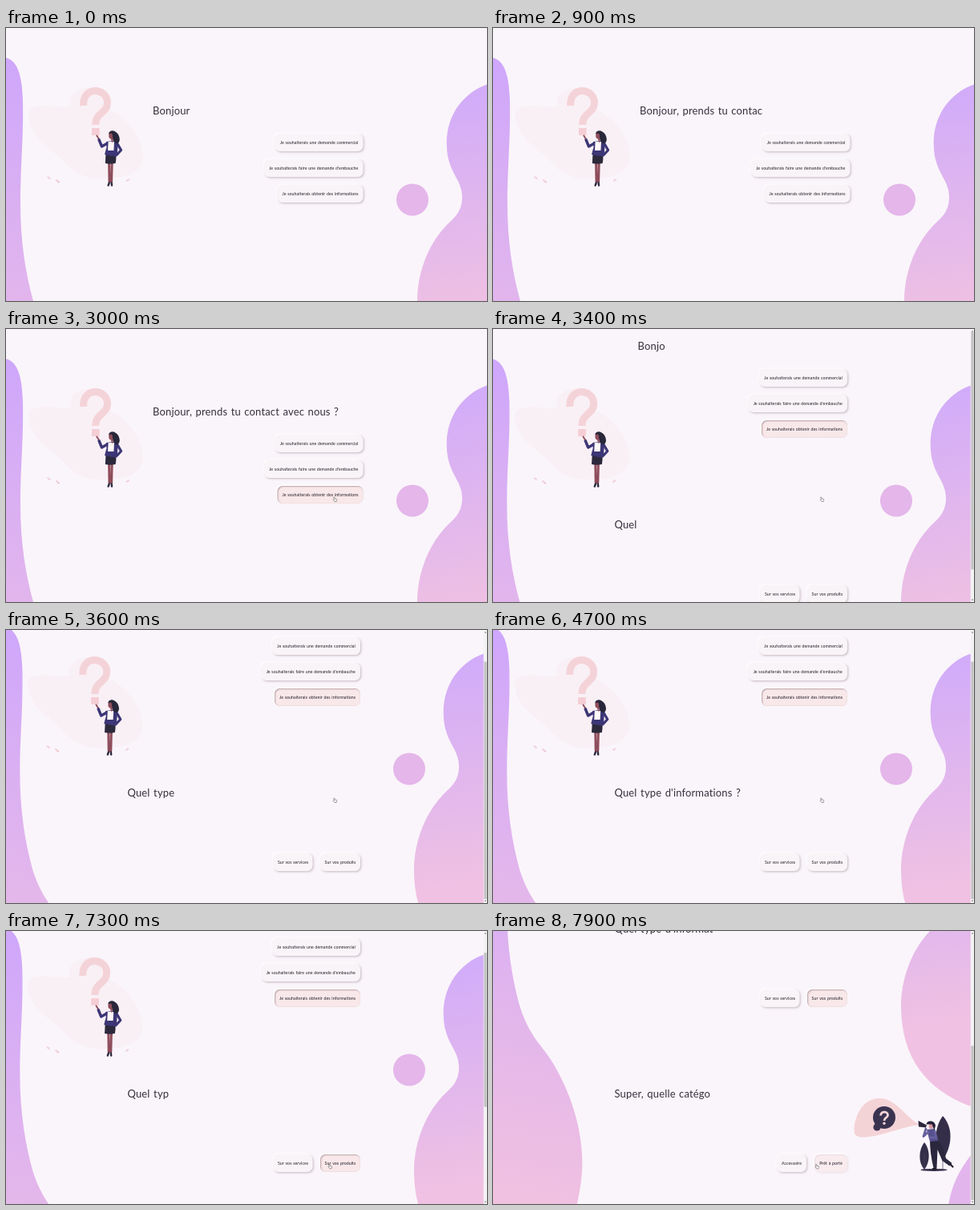
These frames come from a looping animation (600 by 341 pixels, 8000 ms). An HTML page with a canvas:

```html
<!DOCTYPE html>
<html lang="fr">
<head>
<meta charset="utf-8">
<title>Formulaire de contact</title>
<style>
  html, body { margin: 0; width: 100%; height: 100%; overflow: hidden; background: #faf5fa; }
  canvas { display: block; width: 600px; height: 341px; }
</style>
</head>
<body>
<canvas id="stage"></canvas>
<script>
const W = 600, H = 341, LOOP = 8000;
const CLICK_1 = 3130, CLICK_2 = 6880, SCROLL_DELAY = 450, CHAR_MS = 50;
const canvas = document.getElementById('stage');
const ctx = canvas.getContext('2d');
const dpr = window.devicePixelRatio || 1;
canvas.width = W * dpr;
canvas.height = H * dpr;

const clamp = v => Math.max(0, Math.min(1, v));
const ramp = (t, a, b) => clamp((t - a) / (b - a));
const ease = p => p * p * (3 - 2 * p);
const mix = (a, b, p) => a + (b - a) * p;

function fill(path, color) {
  ctx.fillStyle = color;
  ctx.fill(typeof path === 'string' ? new Path2D(path) : path);
}

function line(path, color, width, cap = 'round') {
  ctx.strokeStyle = color;
  ctx.lineWidth = width;
  ctx.lineCap = cap;
  ctx.lineJoin = 'round';
  ctx.stroke(new Path2D(path));
}

function oval(x, y, rx, ry, color, angle = 0) {
  const path = new Path2D();
  path.ellipse(x, y, rx, ry, angle, 0, Math.PI * 2);
  fill(path, color);
}

function gradient(x0, y0, x1, y1, from, to) {
  const g = ctx.createLinearGradient(x0, y0, x1, y1);
  g.addColorStop(0, from);
  g.addColorStop(1, to);
  return g;
}

function at(dx, dy, draw) {
  ctx.save();
  ctx.translate(dx, dy);
  draw();
  ctx.restore();
}

function setShadow(color, dx, dy, blur) {
  ctx.shadowColor = color;
  ctx.shadowOffsetX = dx * dpr;
  ctx.shadowOffsetY = dy * dpr;
  ctx.shadowBlur = blur * dpr;
}

function leftWave() {
  fill('M-1 37C14 40 20 58 21 90C22 140 18 170 18 220C18 265 24 305 34 341C41 363 50 378 62 393' +
    'C90 428 112 485 112 536C112 555 109 572 105 590L-1 590Z',
    gradient(70, 37, -40, 590, '#cea6fc', '#f2c2df'));
}

function rightWave() {
  fill('M620 66L600 70.5C565 83 544 118 551 160C556 184 569 192 569 211C569 232 557 238 548 248' +
    'C524 274 513 310 513 341C513 405 545 446 600 466L620 470Z',
    gradient(550, 70, 595, 360, '#d0abfa', '#f0c1e2'));
  fill('M620 500L600 527C585 547 576 565 572 590L620 590Z', '#e3b5ed');
  oval(507, 214.5, 20, 20, '#e4b6ea');
}

function questionScene() {
  fill('M28 112C26 97 42 96 62 98C84 101 100 93 120 98C145 105 172 135 171 162C169 184 140 190 112 188' +
    'C84 186 76 168 62 157C44 143 31 132 28 112Z', '#f9f0f5');
  oval(103, 92, 23, 17, '#f9f0f5');
  line('M96.7 97C95 72 126 74 126.5 93C126.5 107 111.7 105 111.7 121', '#f4d3d8', 9, 'butt');
  fill('M107 125h9.6v9h-9.6z', '#f4ced4');
  for (const [x, y, a] of [[53.5, 187, .6], [64, 191, .7], [152, 190, -.6]]) oval(x, y, 2.6, 1.2, '#f1d3da', a);
  oval(66, 192.5, 1.2, .8, '#e8b9c2');

  line('M128.6 168L129 192M132.2 168L131.6 192', '#8f4d5b', 3);
  line('M128.7 193.5L127.6 196.6M131.7 193.5L132 196.6', '#2d2a40', 2.4);
  fill('M124.8 152L136 152Q138.4 161 136.6 169Q130 170.5 123.8 169Z', '#2c293c');
  line('M126.5 144L119.5 148L116 139.5', '#3c3676', 3.4);
  line('M115.5 138L113.3 134.6', '#8f4d5b', 1.9);
  line('M138.6 144L143.6 152.5L138.6 158', '#3c3676', 3.2);
  fill('M125 142L138 140.5L139.5 148L138.5 160.5Q131 160 123 158L125.5 149Z', '#3c3676');
  fill('M127.6 142L135 142L134.4 153L127 153Z', '#fff8f8');
  oval(137, 137, 4.4, 7.4, '#29273a', -.3);
  oval(132.8, 131.8, 4.6, 3.6, '#29273a');
  oval(130.6, 134.8, 2.4, 3.4, '#8f4d5b');
  fill('M130 137L133.6 137L133 144Z', '#8f4d5b');
}

function megaphoneScene() {
  fill('M531 241C516 234 503 209 482 209C458 209 450 237 450.5 250C451 260 464 258 476 256C496 252 510 245 531 242Z', '#f4d3d7');
  oval(488, 233, 14, 14, '#3a3350');
  oval(479, 245, 4.6, 4.6, '#3a3350');
  line('M483.6 230.5C484 224.5 492.5 225 492.5 230C492.5 233.5 488 233 488 237', '#f4d3d7', 2.8, 'butt');
  oval(488, 240.2, 1.7, 1.7, '#f4d3d7');

  oval(550, 298.4, 16.5, 1.5, '#342e49');
  fill('M561 231C572 243 575 263 562 285C549 270 550 246 561 231Z', '#342e49');
  fill('M538 264C545 272 546 288 538 298C530 289 531 273 538 264Z', '#342e49');
  line('M561 284L561 297M538 278L538 298', '#4b4561', .7);
  fill('M545 261L555 261Q562 270 565 284L572.5 290L569.5 293.5L560.5 287L554.5 273L553.5 296L549.5 296Q545 277 545 261Z', '#2b273d');
  line('M549 297.2L552.5 297.2M571 292L573.5 294.5', '#1e1b2c', 2.2);
  fill('M541 248L551 247L555.5 262L545 263Z', '#56508f');
  line('M543 251L537 256.5L540 247M551 250L553 258L545 258', '#67619f', 2.8);
  oval(546.4, 243.8, 2.8, 3.4, '#d49aa3');
  fill('M540.5 241.5C541 236 551 236 552 243L550.5 249L547.6 241.5Z', '#242138');
  fill('M530.5 237L541 242.5L540 245.5L531 244.5Z', '#2b273d');
}

function button({ x, y, w, label }, press) {
  const box = new Path2D();
  box.roundRect(x, y, w, 22, 6.5);
  ctx.save();
  setShadow('rgba(255,255,255,1)', -1.2, -1.2, 2);
  fill(box, '#faf5f8');
  setShadow(`rgba(120,100,115,${.36 * (1 - press)})`, 1.2, 1.2, 2.4);
  fill(box, '#f9f4f7');
  ctx.restore();

  ctx.save();
  ctx.clip(box);
  ctx.globalAlpha = press;
  fill(box, '#f9e8ea');
  ctx.globalAlpha = press ** 4;
  const frame = new Path2D();
  frame.rect(x - 20, y - 20, w + 40, 62);
  frame.addPath(box);
  setShadow('rgba(110,75,85,.55)', .8, .8, 1.8);
  ctx.fillStyle = '#e6d0d5';
  ctx.fill(frame, 'evenodd');
  ctx.restore();

  ctx.font = '5.25px Lato, sans-serif';
  ctx.letterSpacing = '0.06px';
  ctx.wordSpacing = '0.3px';
  ctx.textAlign = 'center';
  ctx.fillStyle = '#211d28';
  ctx.fillText(label, x + w / 2, y + 12.9);
}

function title(text, x, y, count) {
  ctx.font = '13px Lato, sans-serif';
  ctx.letterSpacing = '0.15px';
  ctx.wordSpacing = '1px';
  ctx.textAlign = 'left';
  ctx.fillStyle = '#35303d';
  ctx.fillText(text.slice(0, Math.max(0, count)), x, y);
}

const subjects = [
  { x: 335.5, y: 132, w: 110, label: 'Je souhaiterais une demande commercial' },
  { x: 322, y: 164, w: 123.5, label: "Je souhaiterais faire une demande d'embauche" },
  { x: 338.5, y: 196, w: 107, label: 'Je souhaiterais obtenir des informations' }
];
const topics = [
  { x: 333.5, y: 320, w: 49, label: 'Sur vos services' },
  { x: 392, y: 320, w: 50, label: 'Sur vos produits' }
];
const categories = [
  { x: 354, y: 526, w: 37, label: 'Accessoire' },
  { x: 401, y: 526, w: 41, label: 'Prêt à porté' }
];

// [time, x, y] stops of the pointer
const pointerPath = [
  [1000, 506, 300], [1700, 460.7, 207], [2800, 460.7, 207], [3000, 408.6, 209.7],
  [5100, 408.6, 209.7], [5900, 424, 287], [6700, 402.4, 291]
];

function pointerAt(t) {
  const next = pointerPath.findIndex(p => p[0] > t);
  if (next < 0) return pointerPath[pointerPath.length - 1].slice(1);
  const [t0, x0, y0] = pointerPath[next - 1], [t1, x1, y1] = pointerPath[next];
  const p = ease(ramp(t, t0, t1));
  return [mix(x0, x1, p), mix(y0, y1, p)];
}

function pointer(t) {
  if (t < 1000) return;
  const hand = (t > 2880 && t < 5150) || t > 5800;
  const [x, y] = pointerAt(t);
  at(x, y, () => {
    const shape = hand
      ? 'M.2 .5Q.8 -.2 1.3 .5L1.5 2.2L3.8 2.7Q4.3 3 4.1 4L3.6 5.8L1.3 5.8L-.4 3.7Q-.3 3 .5 3.3Z'
      : 'M0 0L0 4.4L1 3.5L1.8 5.1L2.5 4.8L1.8 3.2L3.1 3.1Z';
    fill(shape, hand ? '#fff' : '#111');
    line(shape, hand ? '#444' : '#fff', hand ? .5 : .25);
  });
}

function scrollbar(scroll, pageHeight) {
  ctx.fillStyle = '#f3f2f3';
  ctx.fillRect(595.7, 0, 5, H);
  ctx.fillStyle = '#c2c1c2';
  ctx.fillRect(596.4, 4 + scroll / pageHeight * 332, 3.2, H / pageHeight * 332);
  fill('M596.9 3.4L598 2L599.1 3.4ZM596.9 337.8L598 339.2L599.1 337.8Z', '#555');
}

function draw(t) {
  const step = t < CLICK_1 ? 0 : t < CLICK_2 ? 1 : 2;
  const typingStart = [-370, CLICK_1, CLICK_2][step];
  const count = Math.floor((t - typingStart) / CHAR_MS);
  const scroll = t >= CLICK_2 + SCROLL_DELAY ? 247 : t >= CLICK_1 + SCROLL_DELAY ? 41 : 0;
  const narrow = step ? 1 : 0;

  ctx.setTransform(dpr, 0, 0, dpr, 0, 0);
  ctx.fillStyle = '#faf5fa';
  ctx.fillRect(0, 0, W, H);

  at(0, -scroll, () => {
    at(-.6 * narrow, 0, leftWave);
    at(-4 * narrow, 0, rightWave);
    at(-.8 * narrow, 0, questionScene);
    at(-3.5 * narrow, -82 * narrow, () => {
      title('Bonjour, prends tu contact avec nous ?', 183 + narrow, 108.3, count);
      subjects.forEach((b, i) => button(b, i === 2 ? ramp(t, 2800, 2990) : 0));
    });
    if (step >= 1) {
      title("Quel type d'informations ?", 151.5, 248.5, count);
      topics.forEach((b, i) => button(b, i === 1 ? ramp(t, 5800, 6000) : 0));
    }
    if (step >= 2) {
      at(0, 247, megaphoneScene);
      title('Super, quelle catégorie ?', 151.5, 454.5, count);
      categories.forEach((b, i) => button(b, i === 1 ? ramp(t, 7720, 7990) : 0));
    }
  });

  if (step) scrollbar(scroll, step === 1 ? 382 : 588);
  pointer(t);
}

const begin = performance.now();
function tick() {
  draw((performance.now() - begin) % LOOP);
  requestAnimationFrame(tick);
}
tick();
</script>
</body>
</html>
```
